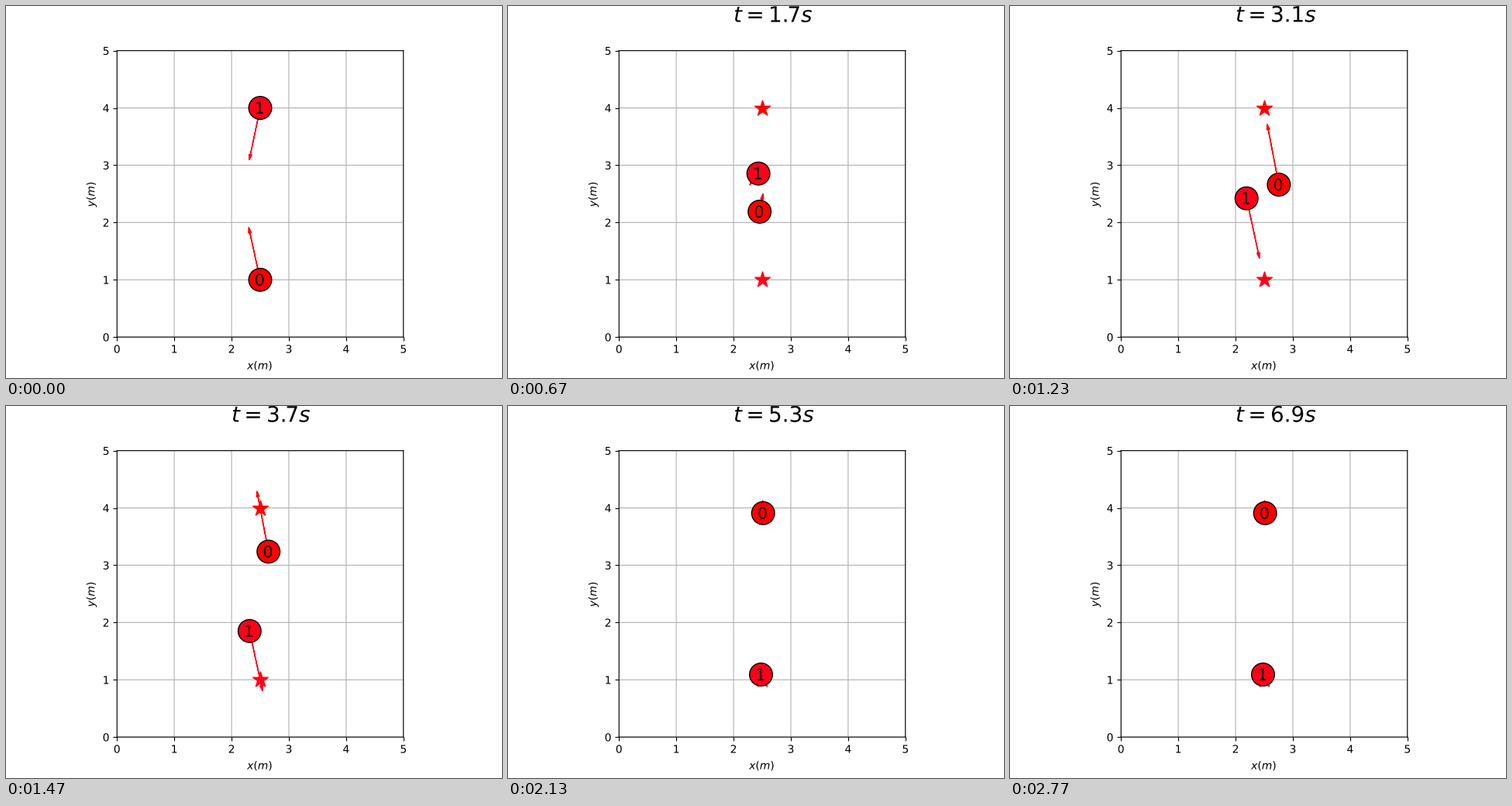
A matplotlib script for the animation above (2810 ms loop, 640x480 px).

```python
import numpy as np
import matplotlib.pyplot as plt
from matplotlib import patheffects
from matplotlib.animation import FuncAnimation
from matplotlib.patches import Circle, FancyArrow

LOOP, TICK, STEPS = 2810, 10, 70
CRUISE, PASS, HOME = 1.1, 2.6, 3.05  # when each leg of the trip turns
LEAN, UPRIGHT = -0.13, 2.0           # early sideways pull on the arrows

# Unsnapped lines and outlined text sit at their exact subpixel places.
plt.rcParams.update({"path.snap": False, "text.hinting": "none",
                     "path.effects": [patheffects.Normal()]})


def hermite(t, t0, p0, v0, t1, p1, v1):
    h = t1 - t0
    s = (t - t0) / h
    return ((1 + 2 * s) * (1 - s) ** 2 * p0 + s * (1 - s) ** 2 * h * v0
            + s * s * (3 - 2 * s) * p1 + s * s * (s - 1) * h * v1)


class Robot:
    """Cruises, slows to pass the other robot, then heads straight home.

    Points and velocities are complex numbers, x + yj.
    """

    def __init__(self, ax, name, color, goal, start, cruise_v,
                 mid, mid_v, end, home_v, stop):
        self.start, self.cruise_v = start, cruise_v
        self.mid, self.mid_v = mid, mid_v
        self.end, self.home_v, self.stop = end, home_v, stop
        ax.scatter(goal.real, goal.imag, s=15 ** 2, marker="*", color=color,
                   linewidth=1, zorder=2)
        self.arrow = FancyArrow(0, 0, 1, 1, width=0.001, head_width=0.05,
                                head_length=0.1, color=color, zorder=2.1)
        self.disc = Circle((0, 0), 0.2, facecolor=color, edgecolor="black",
                           zorder=3)
        ax.add_patch(self.arrow)
        ax.add_patch(self.disc)
        self.label = ax.text(0, 0, name, fontsize=15, zorder=4)

    def cruise(self, t):
        return self.start + self.cruise_v * t

    def home(self, t):
        return self.end + self.home_v * (t - self.stop)

    def position(self, t):
        if t < CRUISE:
            return self.cruise(t)
        if t < PASS:
            return hermite(t, CRUISE, self.cruise(CRUISE), self.cruise_v,
                           PASS, self.mid, self.mid_v)
        if t < HOME:
            return hermite(t, PASS, self.mid, self.mid_v,
                           HOME, self.home(HOME), self.home_v)
        return self.home(t)

    def velocity(self, t, e=1e-3):
        return (self.position(t + e) - self.position(t - e)) / (2 * e)

    def move(self, t):
        p = self.position(min(t, self.stop))
        lean = LEAN * np.clip((UPRIGHT - t) / (UPRIGHT - CRUISE), 0, 1)
        v = self.velocity(t) + lean
        self.disc.center = p.real, p.imag
        self.label.set_position((p.real - 0.1, p.imag - 0.1))
        self.arrow.set_data(x=p.real, y=p.imag, dx=v.real, dy=v.imag)
        self.arrow.set_visible(t < self.stop - 1e-6)


fig, ax = plt.subplots(figsize=(6.4, 4.8), dpi=100)
ax.set_aspect("equal")
ax.set_xlim(0, 5)
ax.set_ylim(0, 5)
ax.set_xlabel("$x(m)$")
ax.set_ylabel("$y(m)$")
ax.grid(True)
clock = ax.text(2, 5.5, "", fontsize=20)

low, high = 2.5 + 1j, 2.5 + 4j
robots = [
    Robot(ax, "0", (1, 0, 0), goal=high, start=low, cruise_v=-0.05 + 0.82j,
          mid=2.645 + 2.308j, mid_v=0.35 + 0.23j,
          end=2.516 + 3.909j, home_v=-0.184 + 0.96j, stop=4.4),
    Robot(ax, "1", (1, 0, 0.094), goal=low, start=high,
          cruise_v=-0.041 - 0.814j,
          mid=2.286 + 2.79j, mid_v=-0.33 - 0.255j,
          end=2.479 + 1.0915j, home_v=0.205 - 0.95j, stop=4.5),
]

# Simulation steps run at 25 per second, snapped to a 30 Hz clock.
starts = [10 * round(round(1.2 * k) * 10 / 3) for k in range(STEPS)]


def update(i):
    step = np.searchsorted(starts, i * TICK, side="right") - 1
    t = step / 10
    clock.set_text(f"$t={t:.1f}s$" if step else "")
    for robot in robots:
        robot.move(t)
    return [clock]


anim = FuncAnimation(fig, update, frames=LOOP // TICK, interval=TICK,
                     repeat=True, repeat_delay=0, blit=False)
plt.show()
```
